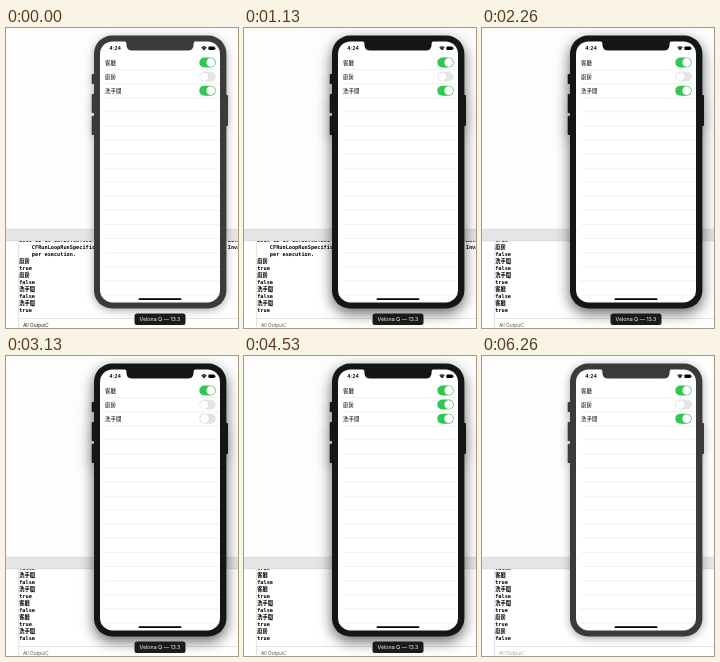
An HTML page that plays this animation: 232 by 300 pixels, repeating every 6.33 s.

```html
<!DOCTYPE html>
<html lang="zh-Hant">
<head>
<meta charset="utf-8">
<style>
  html, body { margin: 0; width: 100%; height: 100%; overflow: hidden; background: #fdfdfd; }
  svg { display: block; width: 232px; height: 300px; }
  text { font-family: Inter, "Noto Sans CJK TC", "Noto Sans CJK", sans-serif; }
  #console text { font: bold 5.25px "DejaVu Sans Mono", "Noto Sans CJK TC", "Noto Sans CJK", monospace; white-space: pre; }
  #phone { fill: #3b3b3c; filter: drop-shadow(0 2px 4px #0005); }
  #phone.active { fill: #151617; filter: drop-shadow(0 5px 7px #0009); }
</style>
</head>
<body>
<svg viewBox="0 0 232 300">
  <defs><clipPath id="pane"><rect x="13" y="213" width="219" height="77"/></clipPath></defs>
  <rect y="213" width="232" height="87" fill="#fff"/>
  <g clip-path="url(#pane)"><g id="console"></g></g>
  <rect y="201" width="232" height="12" fill="#e5e5e5"/>
  <path d="M0 201.2H232M0 212.8H232" stroke="#d2d2d2" stroke-width=".5"/>
  <path d="M12.7 213V300M13 290.5H232" stroke="#cfcfcf" stroke-width=".6"/>
  <g id="filter">
    <text x="17" y="298.8" font-size="4.9">All Output</text>
    <path d="M40 296.4l1.1-1.3 1.1 1.3M40 297.8l1.1 1.3 1.1-1.3" fill="none" stroke="#000" stroke-width=".5"/>
  </g>

  <g id="phone">
    <rect x="85.7" y="46" width="4" height="10" rx=".8"/>
    <rect x="85.7" y="66" width="4" height="19" rx=".8"/>
    <rect x="85.7" y="88" width="4" height="19" rx=".8"/>
    <rect x="218" y="67" width="4" height="31" rx=".8"/>
    <rect x="88" y="7.6" width="132.4" height="272.8" rx="18"/>
    <rect x="94" y="13.4" width="120" height="261" rx="12.5" fill="#fff"/>
    <path d="M118.4 13H189.6Q187.6 13.4 187.6 15.6V16.4Q187.6 22.6 181.4 22.6H126.6Q120.4 22.6 120.4 16.4V15.6Q120.4 13.4 118.4 13Z"/>
  </g>
  <g id="status">
    <text x="103.2" y="22.3" font-size="5.2" font-weight="600">4:24</text>
    <path d="M195.3 19.5Q198 17.1 200.7 19.5L198 22.4Z"/>
    <path d="M195.7 20.2Q198 18.4 200.3 20.2M196.6 21.1Q198 20 199.4 21.1" fill="none" stroke="#fff" stroke-width=".3"/>
    <rect x="202.4" y="18.5" width="6.5" height="3.6" rx="1"/>
    <rect x="209.2" y="19.6" width=".6" height="1.4" rx=".3"/>
  </g>
  <g id="rows"></g>
  <rect x="132.5" y="270.2" width="43" height="1.7" rx=".85"/>

  <g id="label">
    <rect x="128.5" y="285.5" width="51" height="11.5" rx="2.5" fill="#1b1b1c"/>
    <text x="154" y="293.2" font-size="5.3" fill="#fff" text-anchor="middle">Velona Q — 13.3</text>
  </g>
</svg>
<script>
const LOOP = 6330, ROW = 14.08, LINE = 7;
const rooms = ['客廳', '廚房', '洗手間'];
const initial = [1, 0, 1];
const taps = [
  { row: 0, on: 0, press: 1130, release: 1260 },
  { row: 0, on: 1, press: 1660, release: 1930 },
  { row: 2, on: 0, press: 2800, release: 2900 },
  { row: 2, on: 1, press: 3730, release: 3860 },
  { row: 1, on: 1, press: 4130, release: 4260 },
  { row: 1, on: 0, press: 4930, release: 5000 },
];
const log = [
  '2019-12-19 16:23:08.301'.padEnd(66) + 'ailed',
  '    CFRunLoopRunSpecific'.padEnd(66) + 'Inva',
  '    per execution.',
  '廚房', 'true', '廚房', 'false', '洗手間', 'false', '洗手間', 'true',
];
const startLines = log.length;
for (const { row, on } of taps) log.push(rooms[row], String(!!on));

const $ = id => document.getElementById(id);
function add(parent, tag, attrs, text = '') {
  const el = document.createElementNS('http://www.w3.org/2000/svg', tag);
  for (const key in attrs) el.setAttribute(key, attrs[key]);
  el.textContent = text;
  return parent.appendChild(el);
}

const lines = log.map((text, i) =>
  add($('console'), 'text', { x: 13.2, y: 284 + (i - startLines + 1) * LINE }, text));

for (let y = 27.5 + ROW; y < 270; y += ROW)
  add($('rows'), 'path', { d: `M99 ${y}H214`, stroke: '#dcdcde', 'stroke-width': .4 });

const switches = rooms.map((room, i) => {
  const y = 34.5 + i * ROW;
  add($('rows'), 'text', { x: 99, y: y + 2, 'font-size': 5.45 }, room);
  const track = add($('rows'), 'rect', { x: 193.3, y: y - 5, width: 16.4, height: 10, rx: 5 });
  const knob = add($('rows'), 'rect', { y: y - 4.4, height: 8.8, rx: 4.4, fill: '#fff' });
  knob.style.filter = 'drop-shadow(0 .6px .6px #0004)';
  return { track, knob };
});

const ease = u => { u = Math.min(1, Math.max(0, u)); return u * u * (3 - 2 * u); };
const mix = (a, b, u) => a + (b - a) * u;

function drawSwitch({ track, knob }, row, t) {
  let on = initial[row], hold = 0;
  for (const tap of taps) {
    if (tap.row !== row) continue;
    on = mix(on, tap.on, ease((t - tap.release) / 260));
    hold += ease((t - tap.press) / 130) - ease((t - tap.release) / 260);
  }
  const width = 8.8 + 2 * Math.max(0, hold);
  knob.setAttribute('width', width);
  knob.setAttribute('x', mix(193.9, 209.1 - width, on));
  track.setAttribute('fill', `rgb(${mix(229, 48, on)},${mix(229, 200, on)},${mix(232, 82, on)})`);
}

function frame(now) {
  const t = now % LOOP;
  const active = t >= 1130 && t < 6260;
  $('phone').classList.toggle('active', active);
  $('label').style.opacity = 1 - ease((t - 5960) / 140);
  $('filter').style.opacity = t < 1130 ? .9 : t < 6000 ? .65 : .35;

  const added = 2 * taps.filter(tap => t >= tap.release).length;
  $('console').setAttribute('transform', `translate(0 ${-added * LINE})`);
  lines.forEach((line, i) => line.style.display = i < startLines + added ? '' : 'none');
  switches.forEach((s, row) => drawSwitch(s, row, t));
  requestAnimationFrame(frame);
}
const start = performance.now();
requestAnimationFrame(now => frame(Math.max(0, now - start)));
</script>
</body>
</html>
```
